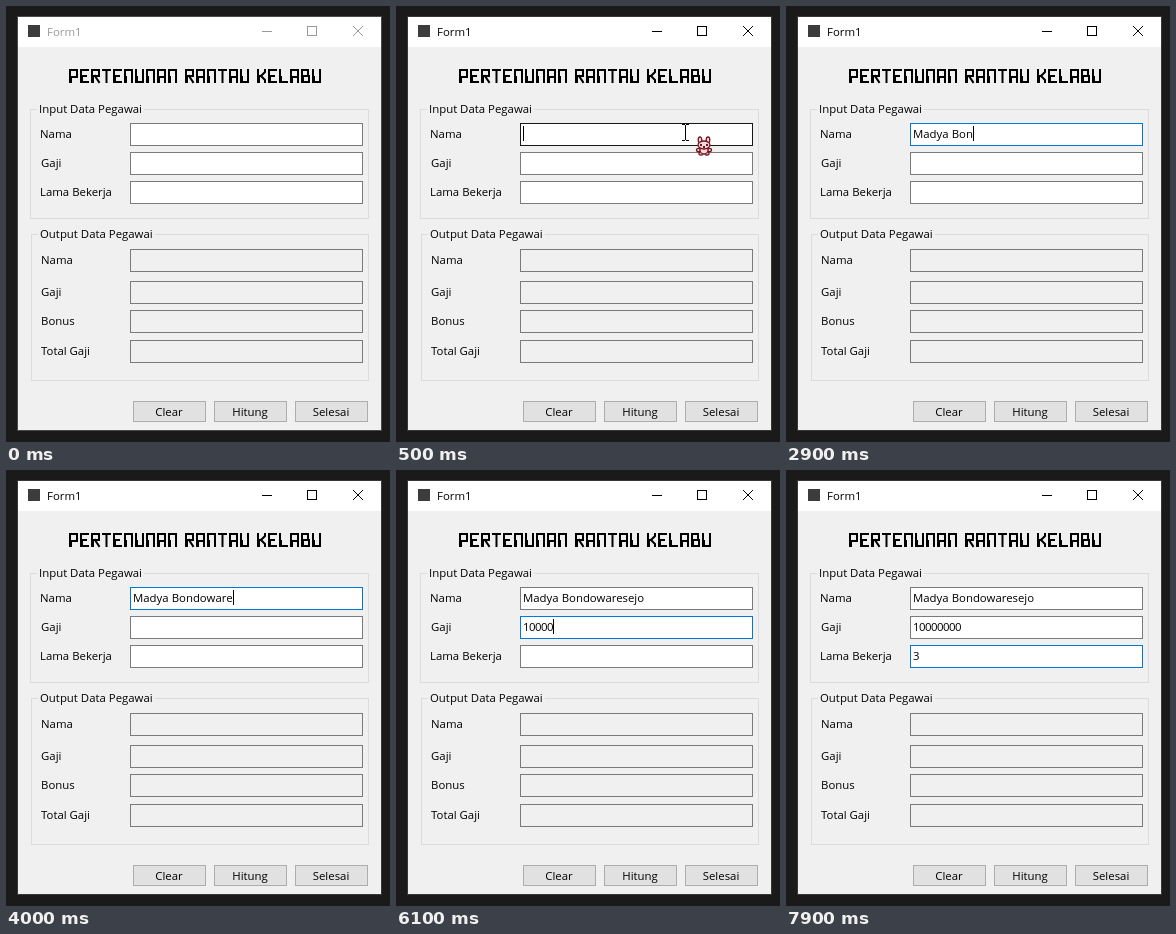
An HTML page with a canvas that plays this animation: 384 px wide and 436 px high, repeating every 8 s.

```html
<!DOCTYPE html>
<html lang="id">
<head>
<meta charset="utf-8">
<title>Form1</title>
<style>
  html, body { margin: 0; width: 100%; height: 100%; overflow: hidden; background: #1a1a1a; }
  canvas { display: block; }
</style>
</head>
<body>
<canvas id="stage" width="384" height="436" role="img" aria-label="PERTENUNAN RANTAU KELABU"></canvas>
<script>
const ctx = document.getElementById('stage').getContext('2d');
const LOOP = 8000, STEP = 100;
const FONT = '11.4px "Open Sans", "Noto Sans", sans-serif';
const GRAY = [122, 122, 122], DARK = [23, 23, 23], BLUE = [0, 120, 215];

const fields = [
  { y: 117, text: 'Madya Bondowaresejo', focus: 500, blur: 4900, fade: 400,
    keys: [1400, 1600, 1600, 1800, 2000, 2400, 2600, 2800, 2900, 3000,
           3200, 3400, 3500, 3600, 4000, 4100, 4100, 4500, 4700] },
  { y: 146, text: '10000000', focus: 4900, blur: 7000, fade: 300, spacing: '-0.5px',
    keys: [5300, 5500, 5800, 5900, 6100, 6400, 6500, 6700] },
  { y: 175, text: '3', focus: 7000, blur: LOOP, fade: 300, spacing: '-0.5px', keys: [7400] }
];

// Heading letters as strokes on a 7 x 12 grid
const glyphs = {
  P: ['0,12 0,0 7,0 7,7 0,7'],
  E: ['7,0 0,0 0,12 7,12', '0,6 5,6'],
  R: ['0,12 0,0 7,0 7,6 0,6', '3,6 7,12'],
  T: ['0,0 7,0', '3.5,0 3.5,12'],
  N: ['0,12 0,0 7,0 7,12'],
  U: ['0,0 0,12 7,12 7,0'],
  A: ['0,12 0,0 7,0 7,12', '0,7 7,7'],
  K: ['0,0 0,12', '7,0 7,2 3,6 1,6', '3,6 7,10 7,12'],
  L: ['0,0 0,12 7,12'],
  B: ['0,0 6,0 6,6 0,6 0,0', '0,6 7,6 7,12 0,12 0,6']
};

const clamp = v => Math.max(0, Math.min(1, v));
const mix = (a, b, k) => a.map((v, i) => Math.round(v + (b[i] - v) * clamp(k)));
const rgb = c => `rgb(${c})`;

function rect(x, y, w, h, color) {
  ctx.fillStyle = color;
  ctx.fillRect(x, y, w, h);
}

function box(x, y, w, h, border, fill) {
  if (fill) rect(x, y, w, h, fill);
  ctx.strokeStyle = border;
  ctx.lineWidth = 1;
  ctx.strokeRect(x + 0.5, y + 0.5, w - 1, h - 1);
}

function label(text, x, y, color = '#000', align = 'left') {
  ctx.fillStyle = color;
  ctx.textAlign = align;
  ctx.fillText(text, x, y);
}

function path(points) {
  ctx.beginPath();
  for (const p of points.split(' ')) ctx.lineTo(...p.split(',').map(Number));
}

function heading(text, x, y) {
  ctx.save();
  ctx.strokeStyle = '#000';
  ctx.lineCap = 'square';
  ctx.translate(x, y);
  for (const ch of text) {
    if (ch === ' ') {
      ctx.translate(6, 0);
      continue;
    }
    ctx.lineWidth = 2;
    for (const line of glyphs[ch]) {
      path(line);
      ctx.stroke();
    }
    if (ch !== 'T') rect(1, 6, 1, 7, '#000');
    ctx.translate(11, 0);
  }
  ctx.restore();
}

function group(title, x, y, w, h) {
  box(x, y, w, h, '#dcdcdc');
  rect(x + 7, y, ctx.measureText(title).width + 4, 1, '#f0f0f0');
  label(title, x + 9, y + 4);
}

function titleBar(active) {
  const ink = active ? '#000' : '#999';
  rect(12, 11, 363, 30, '#fff');
  rect(22, 19, 12, 12, '#3c3c3c');
  label('Form1', 41, 30, ink);
  rect(256, 25, 10, 1, ink);
  box(301, 20, 10, 10, ink);
  ctx.strokeStyle = ink;
  for (const line of ['347,20 357,30', '357,20 347,30']) {
    path(line);
    ctx.stroke();
  }
}

function borderColor(f, t) {
  if (t >= f.blur) return mix(BLUE, GRAY, (t - f.blur + 100) / f.fade);
  if (f === fields[0]) {
    if (t < 400) return GRAY;
    return mix(DARK, BLUE, (t - 500) / 200);
  }
  return t < f.focus ? GRAY : mix(GRAY, BLUE, (t - f.focus + 100) / 300);
}

function field(f, t) {
  box(124, f.y, 233, 23, rgb(borderColor(f, t)), '#fff');
  const pressed = f.keys.filter(k => k <= t);
  const typed = f.text.slice(0, pressed.length);
  ctx.letterSpacing = f.spacing || '0px';
  label(typed, 127, f.y + 15);
  const end = Math.round(127 + ctx.measureText(typed).width);
  ctx.letterSpacing = '0px';

  const since = t - (pressed.length ? pressed[pressed.length - 1] : Math.max(f.focus, f === fields[0] ? 700 : 0));
  if (t >= f.focus && t < f.blur && since < 500) rect(end, f.y + 3, 1, 15, '#000');
}

function ellipse(x, y, rx, ry) {
  ctx.beginPath();
  ctx.ellipse(x, y, rx, ry, 0, 0, Math.PI * 2);
  ctx.fill();
  ctx.stroke();
}

function bunny(x, y) {
  ctx.save();
  ctx.translate(x, y);
  ctx.fillStyle = '#f2dcdc';
  ctx.strokeStyle = '#781422';
  ctx.lineWidth = 1.3;
  for (const s of [-1, 1]) {
    ellipse(s * 4, -6, 1.8, 3);
    ellipse(s * 5.5, 4, 2, 1.7);
    ellipse(s * 3, 7.5, 2, 1.6);
  }
  ellipse(0, 4, 4, 4);
  ellipse(0, -1, 6, 4);
  for (const s of [-1, 1]) rect(s * 3 - 1, -2, 2, 2, '#781422');
  rect(-1, 0, 2, 2, '#781422');
  ctx.restore();
}

function arrow(x, y) {
  ctx.save();
  ctx.translate(x + 0.5, y + 0.5);
  path('0,0 0,16 4,12.5 6.5,18 9,17 6.5,11.5 11,11.5');
  ctx.closePath();
  ctx.fillStyle = '#fff';
  ctx.strokeStyle = '#000';
  ctx.lineWidth = 1;
  ctx.fill();
  ctx.stroke();
  ctx.restore();
}

function beam(x, y) {
  rect(x, y - 7, 1, 15, '#000');
  for (const dy of [-8, 8]) {
    rect(x - 3, y + dy, 3, 1, '#000');
    rect(x + 1, y + dy, 3, 1, '#000');
  }
}

function pointer(t) {
  if (t < 100 || t >= 1400) return;
  const k = clamp((t - 100) / 300);
  const ease = 1 - (1 - k) * (1 - k);
  const x = Math.round(368 - 78 * ease);
  const rise = clamp((t - 500) / 200);
  const y = Math.round(150 - 24 * ease - 29 * rise);
  if (y > 116 && y < 140 && x < 357) {
    beam(x - 1, y);
    bunny(x + 18, y + 14);
  } else {
    arrow(x, y);
    bunny(x + 18, y + 14);
  }
}

function draw(t) {
  const active = t >= 500;
  rect(0, 0, 384, 436, '#1a1a1a');
  box(11, 10, 365, 415, active ? '#383838' : '#4a4a4a', '#f0f0f0');
  ctx.font = FONT;
  titleBar(active);
  heading('PERTENUNAN RANTAU KELABU', 64, 64);

  group('Input Data Pegawai', 24, 103, 339, 110);
  group('Output Data Pegawai', 25, 228, 338, 147);
  ['Nama', 'Gaji', 'Lama Bekerja'].forEach((s, i) => label(s, i === 1 ? 35 : 34, 132 + i * 29));
  for (const f of fields) field(f, t);

  const outputs = { Nama: 243, Gaji: 275, Bonus: 304, 'Total Gaji': 334 };
  for (const [s, y] of Object.entries(outputs)) {
    label(s, 35, y + 15);
    box(124, y, 233, 23, rgb(GRAY));
  }
  ['Clear', 'Hitung', 'Selesai'].forEach((s, i) => {
    const x = 127 + i * 81;
    box(x, 395, 73, 21, '#adadad', '#e1e1e1');
    label(s, x + 36, 410, '#000', 'center');
  });
  pointer(t);
}

const start = performance.now();
function tick() {
  const ms = (performance.now() - start) % LOOP;
  draw(Math.floor(ms / STEP) * STEP);
  requestAnimationFrame(tick);
}
tick();
</script>
</body>
</html>
```
